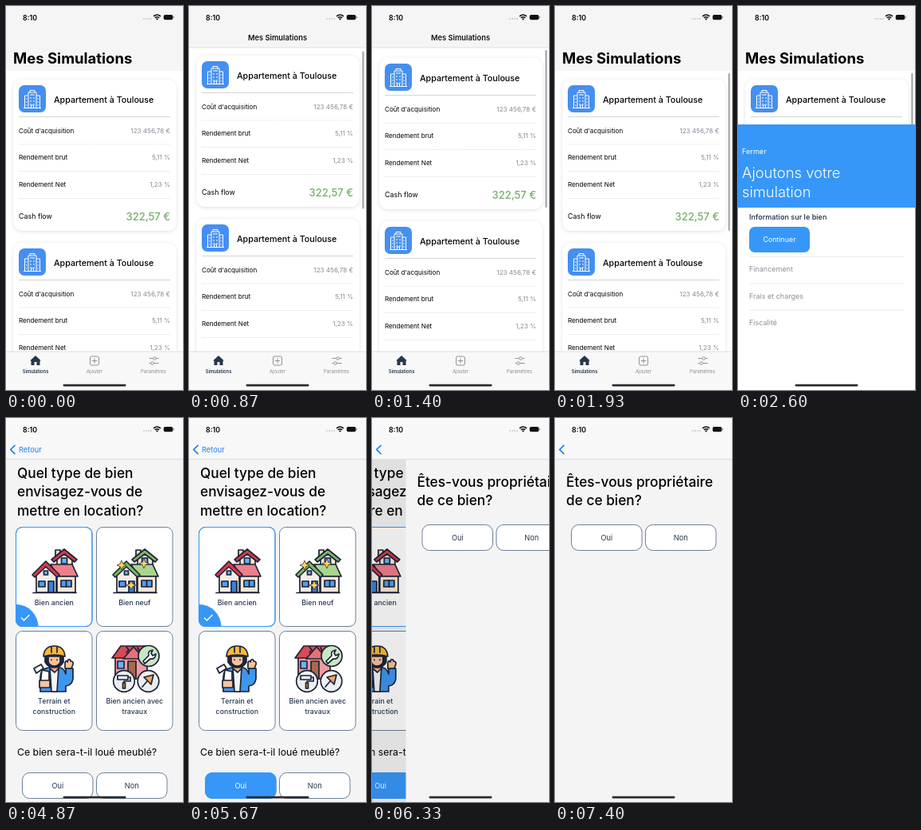
An HTML page that plays this animation: 222x480 px, repeating every 8000 ms.

```html
<!DOCTYPE html>
<html lang="fr">
<head>
<meta charset="utf-8">
<title>Simulations</title>
<style>
  html, body { margin: 0; width: 100%; height: 100%; overflow: hidden; background: #fff; }
  svg { display: block; width: 100vw; height: 100vh; font-family: Inter, Roboto, sans-serif; }
</style>
</head>
<body>
<svg id="stage" viewBox="0 0 222 480"></svg>
<script>
const LOOP = 8000, FPS = 15, W = 222, H = 480;
const BLUE = '#3797f8', NAVY = '#26374d', SLATE = '#6c8098', GREY = '#858b95', LINK = '#1f80ee';

// ---------- drawing helpers ----------
const text = (x, y, size, str, fill = '#000', weight = 400, anchor = 'start') =>
  `<text x="${x}" y="${y + size * 0.355}" font-size="${size}" fill="${fill}" font-weight="${weight}" text-anchor="${anchor}">${str}</text>`;
const centred = (x, y, size, str, fill = NAVY, weight = 400) => text(x, y, size, str, fill, weight, 'middle');
const rect = (x, y, w, h, fill, extra = '') =>
  `<rect x="${x}" y="${y}" width="${w}" height="${h}" fill="${fill}" ${extra}/>`;
const path = (d, fill = 'none', extra = '') => `<path d="${d}" fill="${fill}" ${extra}/>`;
const circle = (x, y, r, fill, extra = '') => `<circle cx="${x}" cy="${y}" r="${r}" fill="${fill}" ${extra}/>`;
const line = (x1, x2, y, colour, extra = '') => path(`M${x1} ${y}H${x2}`, 'none', `stroke="${colour}" ${extra}`);
const group = (id, content, extra = '') => `<g id="${id}" ${extra}>${content}</g>`;
const shift = (x, y, content) => `<g transform="translate(${x} ${y})">${content}</g>`;
const inked = content => `<g stroke="#1c2335" stroke-width="1.7" stroke-linejoin="round" stroke-linecap="round">${content}</g>`;

// ---------- list of simulations ----------
function building() {
  let windows = '';
  for (let y = 16; y <= 25; y += 4) windows += `M14 ${y}h2M18 ${y}h2M9 ${y + 1}h1.5M23.5 ${y + 1}h1.5`;
  return rect(0, 0, 34, 34, '#458ff0', 'rx="7"') +
    path('M6 28.5H28M12 28V9h10V28M12 13H7.5V28M22 13h4.5V28M14 9V6.5h6V9M14 12h6M15.5 28v-3h3v3' + windows,
      'none', 'stroke="#fff" stroke-width="1"');
}

function simulationCard(y) {
  const rows = [['Coût d\'acquisition', '123 456,78 €', 64], ['Rendement brut', '5,11 %', 97.5], ['Rendement Net', '1,23 %', 131.5]];
  return shift(0, y,
    rect(9.5, 0, 204, 189, '#fff', 'rx="11" filter="url(#soft)"') +
    shift(16, 7, building()) +
    text(60, 25, 10.7, 'Appartement à Toulouse', '#000', 500) +
    line(16, 206, 46.5, '#d4d4d6') +
    rows.map(([label, value, cy]) =>
      text(16, cy, 8.1, label) + text(206, cy, 8.1, value, GREY, 400, 'end') +
      line(16, 206, cy + 17, '#dcdcde', 'stroke-dasharray="1.5 1" stroke-width=".8"')).join('') +
    text(16, 171, 8.9, 'Cash flow') +
    text(206, 171.5, 13, '322,57 €', '#74ae68', 500, 'end'));
}

const tabBar =
  rect(0, 432, W, 48, '#f8f8f8') + line(0, W, 432, '#d2d2d2', 'stroke-width=".7"') +
  path('M30.5 443 37 437l6.500 6-1 1V449h-4v-4h-3v4h-4v-5z', NAVY) +
  `<g fill="none" stroke="#8e9196">${rect(105.5, 438, 11, 11, 'none', 'rx="2"')}
   <path d="M111 440.500v6M108 443.500h6M179.500 440.500h5M188.500 440.500h3M179.500 446.500h2M185.500 446.500h6"/>
   ${circle(186.5, 440.5, 1.8, 'none')}${circle(183.5, 446.5, 1.8, 'none')}</g>` +
  centred(37, 456.5, 5.8, 'Simulations', NAVY, 600) +
  centred(111, 456.5, 5.9, 'Ajouter', GREY) + centred(185, 456.5, 5.9, 'Paramètres', GREY);

const home =
  rect(0, 0, W, H, '#fff') +
  group('cards', [92, 296, 500].map(simulationCard).join('')) +
  rect(0, 0, W, 81, '#f5f5f5', 'id="header"') +
  group('largeTitle', text(9, 65.5, 18.5, 'Mes Simulations', '#000', 700), 'clip-path="url(#belowNav)"') +
  group('inlineTitle', centred(111, 39.5, 9.3, 'Mes Simulations', '#111', 600) + line(0, W, 52, '#d5d5d5', 'stroke-width=".7"')) +
  rect(217.3, 0, 2.2, 197, '#a4a4a6', 'id="scrollbar" rx="1.1"') +
  tabBar;

// ---------- modal ----------
const modal =
  rect(0, 0, W, H, '#fff') + rect(0, 0, W, 104, BLUE) +
  text(5, 33.5, 9.1, 'Fermer', '#fff') +
  text(5, 60, 18.4, 'Ajoutons votre', '#fff', 300) + text(5, 84.5, 18.4, 'simulation', '#fff', 300) +
  text(14, 115.5, 9.1, 'Information sur le bien', '#15294b', 500) +
  group('continue', rect(14, 128, 76, 32, BLUE, 'rx="7"') + centred(52, 144, 8.9, 'Continuer', '#fff')) +
  ['Financement', 'Frais et charges', 'Fiscalité'].map((label, i) =>
    line(14, 209, 165.5 + i * 33.3, '#e6e6e8', 'stroke-width=".8"') +
    text(14, 181 + i * 33.3, 9, label, '#8b8f96')).join('');

// ---------- questionnaire ----------
const house = (roof, slope) => inked(
  path('M62 176V165h6v9', '#e8d7c8') + path('M64 173l9-7 10 7v13H64z', '#f8e6d6') +
  path('M57 177 73 164l16 13-3 3-13-10-13 10z', roof) + rect(69.5, 175, 7, 7, '#66b5f5') +
  path('M56 183h27l7 15H64z', slope) + path('M64 198h23v20H64z', '#f8e6d6') +
  rect(69, 203, 13, 8, '#4f9df0') + path('M75.500 203v8') +
  path('M38 196 50 184l13 12v22H38z', '#f3ece8') +
  path('M33 196 50 179l17 17-3 3-14-13-14 13z', roof) + rect(47.5, 191, 5, 5, '#66b5f5') +
  rect(41, 204, 8, 7, '#4f9df0') + rect(53, 204, 7, 14, '#3b7fd4') + path('M34 218.500h54'));

const sparkle = (x, y) =>
  path(`M${x} ${y - 6}l1.800 4.200 4.200 1.800-4.200 1.800-1.800 4.200-1.800-4.200-4.200-1.800 4.200-1.800z`,
    '#ffd152', 'stroke="#20283a" stroke-width=".7"');

const builder = inked(
  path('M43 342v-18q0-10 10-12h15q5 1 7 8v-7h9v13q-1 8-9 9v7z', '#3e96ee') +
  path('M55 312h11l-2 30H57z', '#f3f4f6') + path('M55 308v5l6 5 5-5v-5z', '#f2b48c') +
  path('M49 297h23v8q-4 7-11.500 7T49 305z', '#20283a') +
  path('M53 298h15v7q-2 5-7.500 5T53 305z', '#f8c39c') + path('M57 302v.5M64 302v.5') +
  path('M47 298q1-13 13.500-13T74 298q-13-4-27 0z', '#fcb83c') + path('M57 286v7M64 286v7') +
  path('M74 313v-7q1-4 3-1l1-3q3-1 3 2 4 0 3 4l-2 5z', '#f8c39c') +
  path('M35 313l9-5 3 5-9 6z', '#fff') + path('M45 315l9 2v16H43z', '#fff') +
  path('M42 328h13v9H42z', '#f8c39c'));

const works = inked(
  path('M137 298h40v28h-40z', '#ee9aa2') + path('M133 300l11-15h33l9 15z', '#d94a56') +
  path('M147 301 160 286l13 15z', '#e96f78') + path('M151 286l3 4-3 3M165 287l2 4') +
  rect(140, 304, 8, 9, '#66b5f5') + rect(153, 304, 10, 22, '#a8694a') +
  circle(179, 297.5, 13, '#c9e6c4') + circle(148, 329, 13.3, '#eceff2') + circle(178.5, 329, 13.3, '#eceff2') +
  path('M172 304l7-7q-2-6 5-7l-2 4 2 3 4-2q-1 7-7 6l-7 6z', '#fff') +
  path('M140 322h13v5h-13zM153 324h3v5h-8v2') + rect(146.5, 331, 3, 7, '#ef8a3c') +
  path('M185 321l-3 12-9-9z', '#f0a35c') + path('M177 329l-6 7'));

function choice(x, y, art, lines) {
  const top = lines.length > 1 ? 87.5 : 94.5;
  return rect(x, y, 95.5, 124, '#fff', `rx="8" stroke="${SLATE}"`) + art +
    lines.map((label, i) => centred(x + 47.8, y + top + i * 12.5, 8.9, label, NAVY, 500)).join('');
}

const answer = (x, y, label) =>
  rect(x, y, 88.5, 32, '#fff', `rx="9" stroke="${SLATE}"`) + centred(x + 44.3, y + 16.3, 9.2, label);
const question = (y, lines) => lines.map((label, i) => text(14, y + i * 23.3, 17.3, label, '#000', 450)).join('');

const ancien = house('#d8394e', '#ef7f8c');
const neuf = shift(101, 0, house('#7dbb62', '#a9d58f')) + sparkle(145, 184) + sparkle(173, 182) + sparkle(157, 209);

const typePage =
  rect(0, 0, W, H, '#f4f4f4') +
  question(69, ['Quel type de bien', 'envisagez-vous de', 'mettre en location?']) +
  choice(12.5, 136.5, ancien, ['Bien ancien']) + choice(113.5, 136.5, neuf, ['Bien neuf']) +
  choice(12.5, 266.5, builder, ['Terrain et', 'construction']) +
  choice(113.5, 266.5, works, ['Bien ancien avec', 'travaux']) +
  group('picked',
    path('M12.500 233a28 28 0 0 1 28 27.500h-20q-8 0-8-8z', BLUE) +
    path('M19 249.500l3.500 3.500 7-7', 'none', 'stroke="#fff" stroke-width="1.5"') +
    rect(12.5, 136.5, 95.5, 124, 'none', `rx="8" stroke="${BLUE}" stroke-width="1.100"`)) +
  text(14, 417.5, 12.3, 'Ce bien sera-t-il loué meublé?') +
  answer(20.5, 443.5, 'Oui') + answer(113.5, 443.5, 'Non') +
  group('yes', rect(20, 443, 89.5, 33, BLUE, 'rx="9"') + centred(64.8, 459.8, 9.2, 'Oui', '#fff'));

const ownerPage =
  rect(0, 0, W, H, '#f4f4f4') +
  question(80, ['Êtes-vous propriétaire', 'de ce bien?']) +
  answer(20.5, 133.5, 'Oui') + answer(113.5, 133.5, 'Non');

const navBar =
  rect(0, 0, W, 52, '#f8f8f9') + line(0, W, 51.7, '#d2d3d5', 'stroke-width=".8"') +
  path('M11 34.300 5.800 39.500l5.200 5.200', 'none', `stroke="${LINK}" stroke-width="1.700" stroke-linecap="round"`) +
  group('back', text(16, 39.5, 9.3, 'Retour', LINK));

const statusBar =
  text(21, 14.5, 8.8, '8:10', '#000', 600) +
  [173, 176, 179, 182].map(x => circle(x, 16, 0.8, '#a9abad')).join('') +
  path('M185 12.800q4.500-3.600 9 0M186.800 14.800q2.700-2 5.400 0', 'none', 'stroke="#111" stroke-width="1.600"') +
  circle(189.5, 16.4, 1.1, '#111') +
  rect(197.7, 10.9, 11.6, 6.4, '#111', 'rx="2"') + rect(209.8, 13, 1, 2.2, '#777') +
  rect(71.5, 472.7, 79, 2.7, '#2c2c2e', 'rx="1.3"');

const veil = id => rect(0, 0, W, H, '#000', `id="${id}"`);

document.getElementById('stage').innerHTML =
  `<defs><filter id="soft" x="-10%" y="-10%" width="120%" height="120%">
     <feDropShadow dx="0" dy="1" stdDeviation="2.500" flood-opacity=".13"/></filter>
   <clipPath id="belowNav"><rect y="52" width="222" height="428"/></clipPath></defs>` +
  home + group('modal', modal + veil('modalVeil')) +
  group('form', group('typePage', typePage + veil('typeVeil')) + group('ownerPage', ownerPage) + navBar) +
  statusBar;

// ---------- motion ----------
const el = id => document.getElementById(id);
const clamp = v => Math.max(0, Math.min(1, v));
const move = (id, x, y) => el(id).setAttribute('transform', `translate(${x} ${y})`);
const fade = (id, v) => el(id).setAttribute('opacity', clamp(v));

// Remaining distance (1 to 0) of a critically damped spring.
function spring(t, start, rate) {
  const k = Math.max(0, t - start) / 1000 * rate;
  return (1 + k) * Math.exp(-k);
}

const scrollKeys = [[480, 0], [733, 30], [867, 30], [1100, 90], [1571, 0]];
function scrollAt(t) {
  const i = scrollKeys.findIndex(([time]) => time > t);
  if (i < 1) return 0;
  const [t0, a] = scrollKeys[i - 1], [t1, b] = scrollKeys[i];
  const u = (t - t0) / (t1 - t0);
  return a + (b - a) * u * u * (3 - 2 * u);
}

const stalls = [[733, 866], [2733, 2866], [6333, 6599]];
function recordedTime(t) {
  const time = Math.floor((t + 4) * FPS / 1000) * 1000 / FPS;
  const stall = stalls.find(([from, to]) => time >= from && time < to);
  return stall ? stall[0] + 0.33 : time;
}

function render(t) {
  const s = scrollAt(t), top = 81 - 29 * clamp(s / 27);
  move('cards', 0, -s);
  el('header').setAttribute('height', top);
  el('largeTitle').firstChild.setAttribute('transform', `translate(0 ${-s})`);
  fade('largeTitle', (27 - s) / 6);
  fade('inlineTitle', (s - 16) / 8);
  el('scrollbar').setAttribute('y', top + 3 + Math.max(0, s - 27) * 0.52);
  fade('scrollbar', (t - 480) / 100);

  const pushed = t > 4130 ? 0 : spring(t, 3313, 12.6);
  const asked = t > 6595 ? 0 : spring(t, 6091, 12.6);
  move('modal', -67 * (1 - pushed), t > 3060 ? 0 : H * spring(t, 2500, 24));
  fade('modalVeil', 0.1 * (1 - pushed));
  fade('continue', t < 3330 ? 1 : 0.2 + 0.8 * (t - 3330) / 340);
  move('form', W * pushed, 0);
  move('typePage', -67 * (1 - asked), 0);
  fade('typeVeil', 0.1 * (1 - asked));
  move('ownerPage', W * asked, 0);
  fade('back', 1 - 2 * (1 - asked));
  fade('picked', (t - 4250) / 200);
  fade('yes', (t - 5200) / 200);
}

const begin = performance.now();
function tick() {
  render(recordedTime((performance.now() - begin) % LOOP));
  requestAnimationFrame(tick);
}
tick();
</script>
</body>
</html>
```
